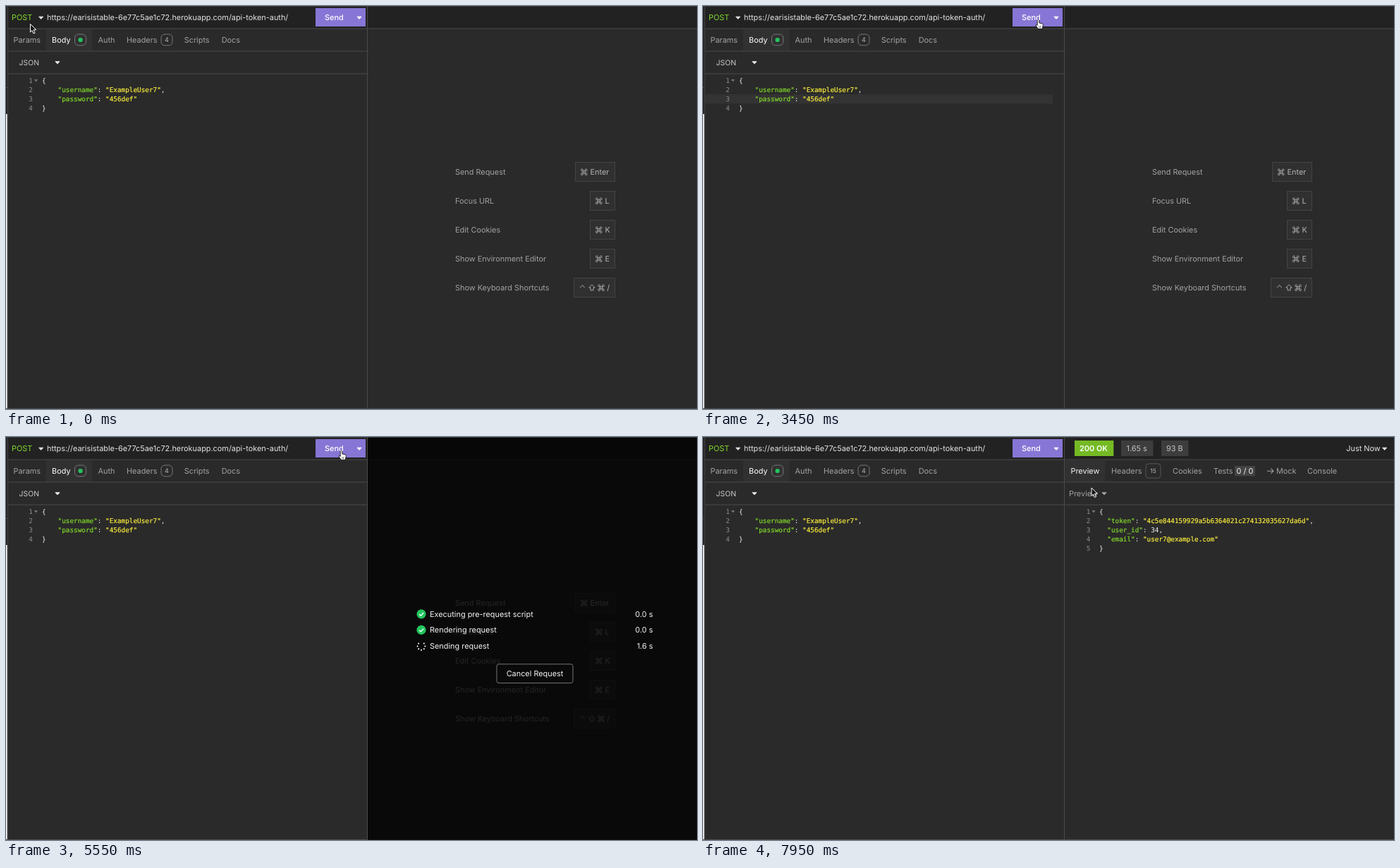
An HTML page that plays this animation: 980x571 px, repeating every 8000 ms.

```html
<!DOCTYPE html>
<html lang="en">
<head>
<meta charset="utf-8">
<title>API client</title>
<style>
html, body { margin: 0; width: 100%; height: 100%; overflow: hidden; background: #2a2a2a; }
svg { display: block; }
text { font: 10.9px Inter, Roboto, sans-serif; white-space: pre; text-rendering: geometricPrecision; }
.code { font: 9.35px "DejaVu Sans Mono", "Liberation Mono", monospace; }
.off { display: none; }
</style>
</head>
<body>
<svg id="stage" width="980" height="571" viewBox="0 0 980 571"></svg>
<script>
const GREEN = '#82d92b', YELLOW = '#fbee3e', WHITE = '#f4f4f4', SOFT = '#e4e4e4';
const GREY = '#a2a2a2', LINE = '#4a4a4a', OK = '#22c55e';
const LOOP = 8000, TICK = 150, SEND = 3900, DONE = 5700;

const rect = (x, y, w, h, fill, extra = '') =>
  `<rect x="${x}" y="${y}" width="${w}" height="${h}" fill="${fill}" ${extra}/>`;
const text = (x, y, str, fill = GREY, extra = '') =>
  `<text x="${x}" y="${y}" fill="${fill}" ${extra}>${str}</text>`;
const sized = px => `style="font-size:${px}px"`;
const frame = (x, y, w, h, r, stroke, fill = 'none') =>
  rect(x, y, w, h, fill, `rx="${r}" stroke="${stroke}"`);
const group = (id, body) => `<g id="${id}">${body}</g>`;
const caret = (x, y, fill = SOFT) =>
  `<path transform="translate(${x} ${y})" d="M-3-1.6H3L0 1.6Z" fill="${fill}" stroke="${fill}" stroke-linejoin="round"/>`;
const fold = x => `<path d="M${x - 2.5} 104H${x + 2.5}L${x} 107.6Z" fill="#777"/>`;
const glyph = (x, y, d) =>
  `<path transform="translate(${x} ${y})" d="${d}" fill="none" stroke="#b4b4b4" stroke-width=".9"/>`;

const COMMAND = 'M-1.5-2.9V2.9A1.4 1.4 0 1 1-2.9 1.5H2.9A1.4 1.4 0 1 1 1.5 2.9V-2.9' +
  'A1.4 1.4 0 1 1 2.9-1.5H-2.9A1.4 1.4 0 1 1-1.5-2.9Z';
const SHIFT = 'M0-4.2L4.2 0H2V3.8H-2V0H-4.2Z';
const CONTROL = 'M-3.2 1.6L0-2L3.2 1.6';

const ink = fill => `fill="${fill}" stroke="${fill}" stroke-width=".2"`;

function colorize(line) {
  return line.replace(/"[^"]*"(:?)/g, (str, colon) => {
    const body = colon ? str.slice(0, -1) : str;
    return `<tspan ${ink(colon ? GREEN : YELLOW)}>${body}</tspan>${colon}`;
  });
}

function editor(numX, codeX, lines) {
  return lines.map((line, i) => {
    const y = 108.7 + i * 13.15;
    const indent = line.search(/\S/);
    return text(numX, y, i + 1, '#8c8c8c', 'class="code" text-anchor="end"') +
      text(codeX + indent * 5.63, y, colorize(line.trim()), WHITE, 'class="code"');
  }).join('');
}

function requestPane() {
  return rect(0, 0, 980, 32, '#222222') +
    rect(57, 32.5, 65.5, 31, '#313131') +
    text(8, 20, 'POST', GREEN) + caret(49.7, 16.8) +
    text(58, 20, 'https://earisistable-6e77c5ae1c72.herokuapp.com/api-token-auth/', SOFT) +
    rect(439, 3, 71, 26, '#8776d5') +
    text(452, 20, 'Send', '#fff', 'style="font-weight:500"') + caret(501, 16.8, '#fff') +
    text(10.5, 52, 'Params') + text(65, 52, 'Body', '#fff') +
    frame(97.5, 40, 16.2, 15.8, 5, '#777') + `<circle cx="105.6" cy="48" r="3.1" fill="${OK}"/>` +
    text(130.5, 52, 'Auth') + text(171, 52, 'Headers') +
    frame(220, 40, 16, 15.8, 5, '#777') +
    text(228, 51.3, '4', '#b4b4b4', 'text-anchor="middle" ' + sized(9)) +
    text(252.7, 52, 'Scripts') + text(305.7, 52, 'Docs') +
    text(18.6, 83.8, 'JSON', '#c8c8c8', sized(10.4)) + caret(73, 80.3);
}

function hints() {
  const rows = [['Send Request', 808, 'Enter'], ['Focus URL', 829, 'L'], ['Edit Cookies', 829, 'K'],
    ['Show Environment Editor', 829, 'E'], ['Show Keyboard Shortcuts', 806, '/']];
  return rows.map(([label, x, key], i) => {
    const y = 235 + i * 41, wide = key === '/';
    return text(637, y + 4, label) +
      frame(x - .5, y - 13.5, 864 - x, 27, 0, '#444444', '#303030') +
      (wide ? glyph(817.5, y - 1.5, CONTROL) + glyph(831, y, SHIFT) : '') +
      glyph(wide ? 844 : x + 11.8, y + .3, COMMAND) +
      text(wide ? 852.3 : x + 20.5, y + 4, key, '#b4b4b4');
  }).join('');
}

function progress() {
  const row = (y, label, time, id = '') =>
    text(601, y + 4, label, WHITE) + text(917.5, y + 4, time, WHITE, `text-anchor="end" ${id}`);
  const tick = y => `<circle cx="589" cy="${y}" r="6.6" fill="${OK}"/>` +
    `<path d="M586 ${y + .2}l2.2 2.2 4-4.2" fill="none" stroke="#fff" stroke-width="1.3"/>`;
  let dots = '';
  for (let i = 0; i < 7; i++) {
    const a = i * Math.PI / 4;
    dots += `<circle cx="${5.4 * Math.cos(a)}" cy="${5.4 * Math.sin(a)}" r="1.05" fill="${WHITE}"/>`;
  }
  return rect(513, 1, 467, 570, '#000', 'fill-opacity=".78"') +
    tick(250.8) + row(250.8, 'Executing pre-request script', '0.0 s') +
    tick(273.4) + row(273.4, 'Rendering request', '0.0 s') +
    group('spinner', dots) + row(296.2, 'Sending request', '0 s', 'id="timer"') +
    frame(696, 321.8, 108, 26.8, 3, '#777777') +
    text(750, 339.3, 'Cancel Request', WHITE, 'text-anchor="middle"');
}

function response() {
  return rect(527, 5, 55.3, 22, '#75ba24') +
    text(534, 20, '200 OK', '#fff', 'style="font-weight:600"') +
    rect(593, 5, 45.5, 22, '#3d3d3d') + text(600.5, 20, '1.65 s', '#c4c4c4') +
    rect(650, 5, 38.5, 22, '#3d3d3d') + text(657, 20, '93 B', '#c4c4c4') +
    text(912.3, 20, 'Just Now', SOFT) + caret(966.7, 16.8) +
    group('tabOn', rect(513, 32.5, 57, 31, '#313131')) +
    text(521.5, 52, 'Preview', GREY, 'id="tabLabel"') + text(579, 52, 'Headers') +
    frame(628, 37.8, 21, 20.4, 4, '#555555') +
    text(638.5, 51.2, '15', '#b4b4b4', 'text-anchor="middle" ' + sized(8.6)) +
    text(666, 52, 'Cookies') + text(724, 52, 'Tests') +
    rect(754, 41, 29, 14.2, '#444444') +
    text(768.5, 52, '0 / 0', WHITE, 'text-anchor="middle"') +
    `<path d="M800 48.2H809M805.4 44.7L809 48.2L805.4 51.7" fill="none" stroke="${GREY}" stroke-width="1.1"/>` +
    text(813, 52, 'Mock') + text(857, 52, 'Console') +
    text(519, 83.8, 'Preview') + caret(569, 80.3, GREY) +
    rect(513, 63.5, 467, 1, LINE) + rect(513, 95.5, 467, 1, LINE) +
    editor(549.5, 562, ['{', '  "token": "4c5e844159929a5b6364021c274132035627da6d",',
      '  "user_id": 34,', '  "email": "user7@example.com"', '}']);
}

const pointers =
  group('arrow', '<path d="M.5.5V12L3 9.6 5 14 7 13.1 5.1 8.8H8.8Z" fill="#111" stroke="#fff" stroke-linejoin="round"/>') +
  group('beam', '<path d="M-2.5-6.5Q0-6.5 0-5V5Q0 6.5-2.5 6.5M2.5-6.5Q0-6.5 0-5M0 5Q0 6.5 2.5 6.5" fill="none" stroke="#e6e6e6"/>') +
  group('hand', '<path d="M-1.3 1Q0-1 1.3 1V4.6L5.6 5.6Q7 6 6.8 7.6L5.8 13H-.2L-3.4 8.6Q-3.5 7-2.2 7.2L-1.3 8.2Z" fill="#fff" stroke="#111" stroke-width=".9"/>' +
    '<path d="M1.4 9V11.5M3.3 9V11.5" stroke="#111" stroke-width=".7"/>');

document.getElementById('stage').innerHTML =
  rect(0, 0, 980, 571, '#2a2a2a') + requestPane() +
  group('activeLine', rect(3, 125, 493, 13.2, '#333333')) +
  editor(38, 51, ['{', '    "username": "ExampleUser7",', '    "password": "456def"', '}']) +
  group('foldLeft', fold(42.5)) +
  group('textCaret', rect(186, 126, 1, 13, WHITE)) +
  rect(2, 63.5, 510, 1, LINE) + rect(2, 95.5, 510, 1, LINE) + rect(2, 31.5, 978, 1, LINE) +
  rect(0, 570, 980, 1, LINE) +
  group('hints', hints()) + group('response', response()) + group('foldRight', fold(554)) +
  group('progress', progress()) +
  rect(0, 0, 980, 1, '#3c3c3c') + rect(512, 0, 1, 571, LINE) +
  rect(0, 1, 2, 152, '#222222') + rect(0, 115, 2, 1, LINE) +
  rect(2, 1, 1, 569, '#444444') + rect(0, 153, 1.6, 417, '#ffffff') + pointers;

// Pointer track: start time, shape, x, y
const track = [
  [0, 'arrow', 34, 25], [150, 'beam', 92, 20], [300, 'beam', 205, 16], [450, 'beam', 318, 14],
  [600, 'beam', 376, 15], [750, 'beam', 338, 18], [900, 'beam', 293, 20],
  [1350, 'arrow', 317, 45], [1500, 'beam', 357, 137],
  [1800, 'beam', 262, 134], [1950, 'beam', 186, 132], [2100, 'beam', 165, 132],
  [2250, 'beam', 232, 119], [2400, 'arrow', 390, 57], [2550, 'hand', 475.5, 19.3],
  [7950, 'arrow', 550.5, 71.5]
];

const el = id => document.getElementById(id);
const show = (id, on) => el(id).classList.toggle('off', !on);
const within = (t, from, to) => t >= from && t < to;

function draw(t) {
  const [, shape, x, y] = track.filter(step => step[0] <= t).pop();
  for (const id of ['arrow', 'beam', 'hand']) show(id, id === shape);
  el(shape).setAttribute('transform', `translate(${x} ${y})`);

  show('activeLine', within(t, 2100, SEND));
  show('textCaret', within(t, 2100, 2550) || within(t, 3000, 3450));
  show('foldLeft', !within(t, DONE, 6300));
  show('foldRight', t >= 6300);
  show('hints', t < DONE);
  show('progress', within(t, SEND, DONE));
  show('response', t >= DONE);
  show('tabOn', t > DONE);
  el('tabLabel').setAttribute('fill', t > DONE ? WHITE : GREY);

  // The spinner turns once every two seconds
  const wait = Math.max(0, t - SEND);
  el('timer').textContent = wait ? (Math.floor(wait / 100) / 10).toFixed(1) + ' s' : '0 s';
  el('spinner').setAttribute('transform', `translate(589 296.4) rotate(${(wait + 100) * .18})`);
}

const start = performance.now();
function loop() {
  const t = (performance.now() - start) % LOOP;
  draw(Math.floor(t / TICK) * TICK);
  requestAnimationFrame(loop);
}
draw(0);
requestAnimationFrame(loop);
</script>
</body>
</html>
```
